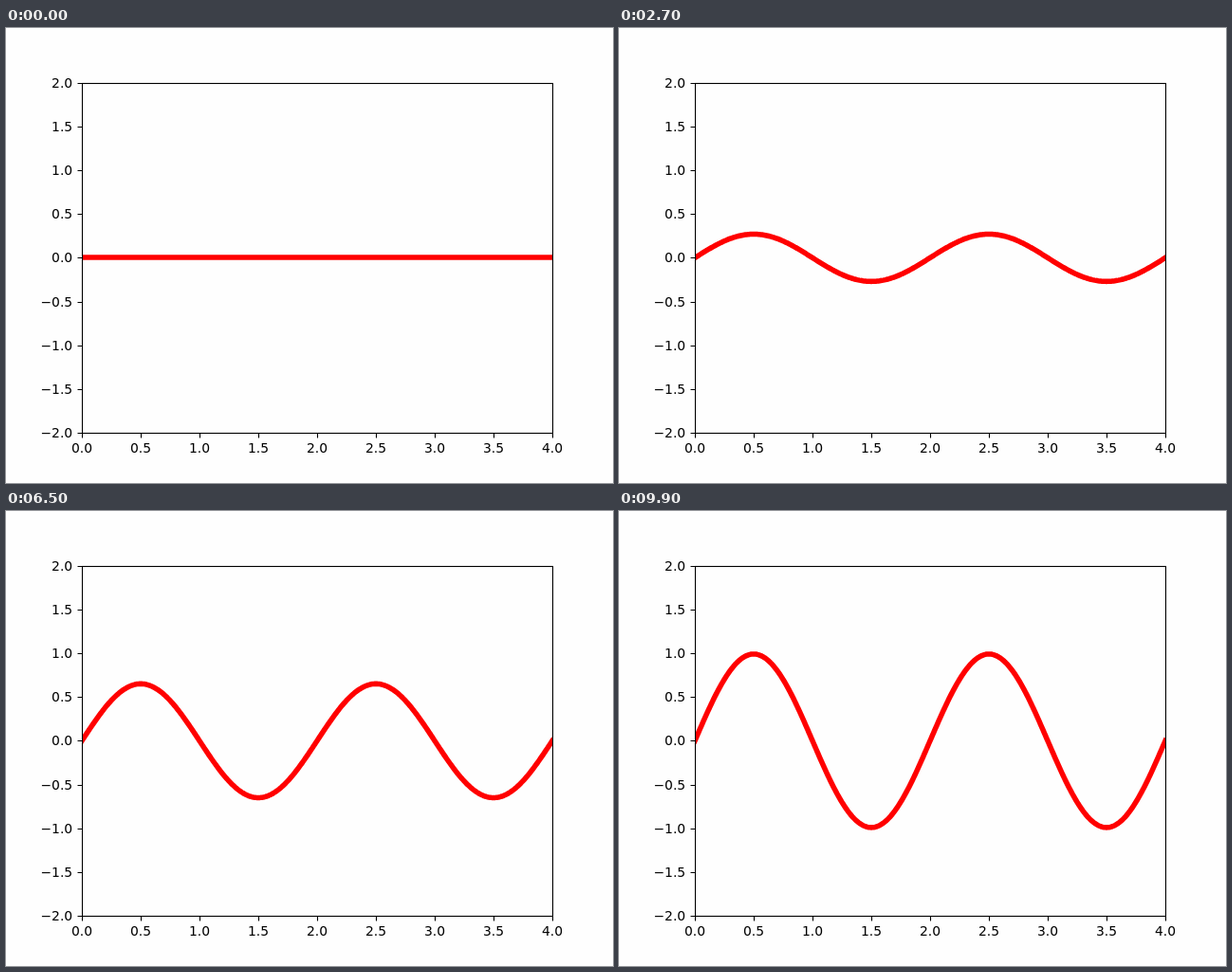
An HTML page that plays this animation: 640x480 px, repeating every 10 s.

```html
<!DOCTYPE html>
<html lang="en">
<head>
<meta charset="utf-8">
<title>Growing sine wave</title>
<style>
  html, body { margin: 0; width: 100%; height: 100%; overflow: hidden; background: #fefefe; }
  svg { display: block; width: 640px; height: 480px; }
  text { font: 13.89px "DejaVu Sans", sans-serif; }
  .axes { fill: none; stroke: #000; stroke-width: 1.11; }
  .wave { fill: none; stroke: #f00; stroke-width: 5.56; stroke-linecap: square; stroke-linejoin: round; }
</style>
</head>
<body>
<svg viewBox="0 0 640 480">
  <clipPath id="plot"><rect x="80" y="58" width="497" height="370"/></clipPath>
  <g clip-path="url(#plot)"><path class="wave" id="wave"/></g>
  <path class="axes" id="ticks"/>
  <rect class="axes" x="80.5" y="58.5" width="496" height="369"/>
  <g id="labels"></g>
</svg>
<script>
  const LEFT = 80, UNIT_X = 124, MIDDLE = 242.4, UNIT_Y = 92.4;
  const STEP_MS = 100, STEPS = 100, SAMPLES = 400;
  const $ = id => document.getElementById(id);

  function addLabel(value, x, y, anchor) {
    const text = document.createElementNS("http://www.w3.org/2000/svg", "text");
    text.setAttribute("x", x);
    text.setAttribute("y", y);
    text.setAttribute("text-anchor", anchor);
    text.textContent = value.toFixed(1).replace("-", "\u2212");
    $("labels").append(text);
  }

  function drawAxes() {
    let ticks = "";
    for (let i = 0; i <= 8; i++) {
      const x = LEFT + i * UNIT_X / 2;
      const value = 2 - i / 2;
      const y = Math.round(MIDDLE - value * UNIT_Y);
      ticks += `M${x + 0.5} 427.5v5M75.5 ${y + 0.5}h5`;
      addLabel(i / 2, x, 448, "middle");
      addLabel(value, 70.2, y + 5, "end");
    }
    $("ticks").setAttribute("d", ticks);
  }

  function wavePath(amplitude) {
    // A flat line sits on the pixel grid
    if (amplitude === 0) return "M80 242H576";
    const points = [];
    for (let i = 0; i <= SAMPLES; i++) {
      const x = 4 * i / SAMPLES;
      const y = MIDDLE - UNIT_Y * amplitude * Math.sin(Math.PI * x);
      points.push(`${(LEFT + x * UNIT_X).toFixed(2)} ${y.toFixed(2)}`);
    }
    return "M" + points.join("L");
  }

  let start = null, shown = -1;
  function frame(now) {
    start ??= now;
    const step = Math.floor((now - start) / STEP_MS) % STEPS;
    if (step !== shown) {
      shown = step;
      $("wave").setAttribute("d", wavePath(step / STEPS));
    }
    requestAnimationFrame(frame);
  }

  drawAxes();
  $("wave").setAttribute("d", wavePath(0));
  requestAnimationFrame(frame);
</script>
</body>
</html>
```
